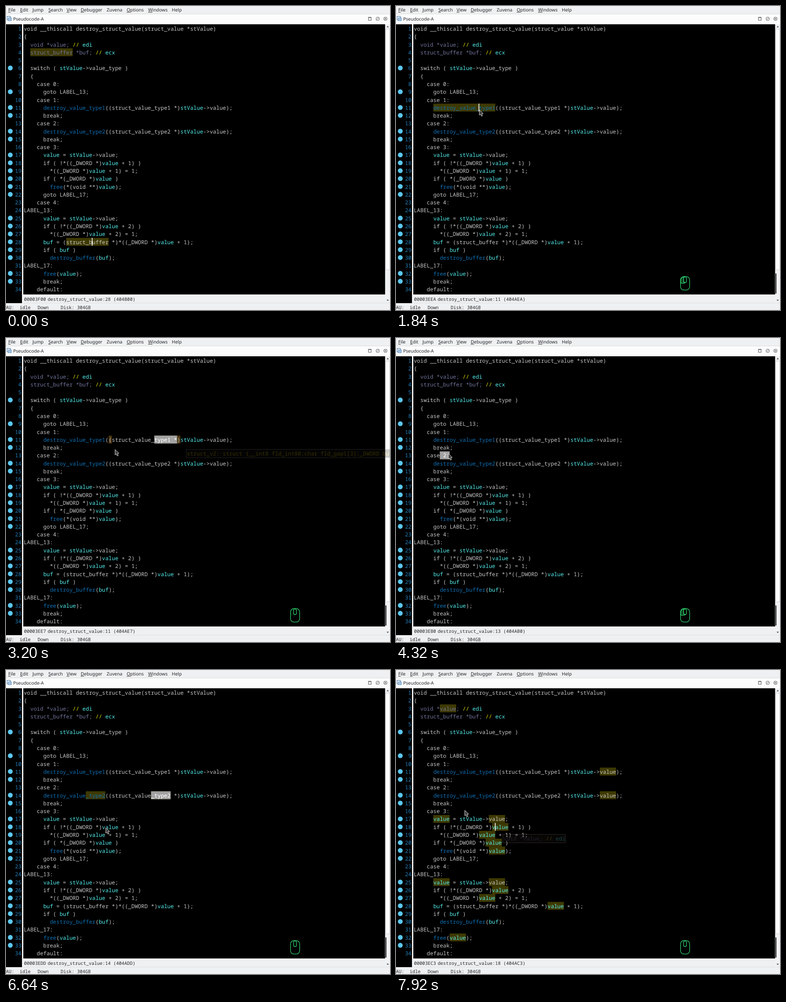
An HTML page that plays this animation: 843x665 px, repeating every 8000 ms.

```html
<!DOCTYPE html>
<html lang="en">
<head>
<meta charset="utf-8">
<title>Pseudocode</title>
<style>
  html, body { margin: 0; width: 100%; height: 100%; overflow: hidden; background: #eff0f1; }
  svg { display: block; width: 100%; height: 100%; }
  text { white-space: pre; text-rendering: geometricPrecision; }
  .code { font: 11.944px "Noto Sans Mono", monospace; fill: #c6c6c6; }
  .ui { font: 10.03px "Noto Sans", sans-serif; fill: #232629; }
  .mono { font: 10.03px "Noto Sans Mono", monospace; fill: #232629; }
  .num { fill: #2380bd; text-anchor: end; }
  .fn { fill: #0f70b4; }
  .var { fill: #55eeee; }
  .decl { fill: #70749c; }
  .note { fill: #e6e600; }
  .key { text-decoration: underline; }
</style>
</head>
<body>
<svg id="stage" viewBox="0 0 843 665" xmlns="http://www.w3.org/2000/svg"></svg>
<script>
const LOOP = 8000, STEP = 80;
const X0 = 38.9, Y0 = 40.7, CW = 7.167, LH = 17.28, BASE = 13.3;

const lines = `void __thiscall destroy_struct_value(struct_value *stValue)
{
  void *value; // edi
  struct_buffer *buf; // ecx

  switch ( stValue->value_type )
  {
    case 0:
      goto LABEL_13;
    case 1:
      destroy_value_type1((struct_value_type1 *)stValue->value);
      break;
    case 2:
      destroy_value_type2((struct_value_type2 *)stValue->value);
      break;
    case 3:
      value = stValue->value;
      if ( !*((_DWORD *)value + 1) )
        *((_DWORD *)value + 1) = 1;
      if ( *(_DWORD *)value )
        free(*(void **)value);
      goto LABEL_17;
    case 4:
LABEL_13:
      value = stValue->value;
      if ( !*((_DWORD *)value + 2) )
        *((_DWORD *)value + 2) = 1;
      buf = (struct_buffer *)*((_DWORD *)value + 1);
      if ( buf )
        destroy_buffer(buf);
LABEL_17:
      free(value);
      break;
    default:`.split("\n");

const breakpoints = [6, 9, 11, 12, 14, 15, 17, 18, 19, 20, 21, 22, 25, 26, 27, 28, 29, 30, 32, 33];

const menu = [["File", 5, 1], ["Edit", 31, 1], ["Jump", 58, 1], ["Search", 93, 1], ["View", 133, 1],
  ["Debugger", 164, 1], ["Zuvena", 221, 0], ["Options", 265, 1], ["Windows", 312, 1], ["Help", 364, 0]];

// Clicks highlight a word; drags select from col to "to" over "dur" ms.
const edits = [
  { at: -1000, line: 28, col: 21, word: "struct_buffer" },
  { at: 1040, line: 10, col: 10 },
  { at: 1840, line: 11, col: 20, word: "destroy_value_type1" },
  { at: 2400, line: 11, col: 40, to: 47, dur: 480 },
  { at: 3920, line: 13, col: 8, to: 11, dur: 400 },
  { at: 4640, line: 14, col: 20, to: 25, dur: 240 },
  { at: 5120, line: 14, col: 39, word: "struct_value_type2" },
  { at: 5520, line: 14, col: 39, to: 45, dur: 320 },
  { at: 7120, line: 18, col: 25, word: "value" }
];

const statuses = [[0, 28, "F00"], [1040, 10, "EB0"], [1840, 11, "EEA"], [2720, 11, "EE7"],
  [4160, 13, "EB0"], [4720, 14, "EE0"], [5120, 14, "EDD"], [7120, 18, "EC3"]];

const pointerPath = [[480, 190, 514], [1040, 112, 206], [1280, 112, 206], [1680, 183, 227], [2080, 183, 227],
  [2400, 327, 226], [2880, 377, 228], [3040, 378, 229], [3200, 239.5, 244], [3840, 143, 258],
  [3920, 99, 257], [4160, 99, 257], [4320, 115, 253], [4640, 183, 278], [4880, 220, 280], [5120, 321, 279],
  [5520, 321, 279], [5840, 363, 281], [5960, 363, 281], [6640, 219, 345], [6960, 218, 344],
  [7600, 218, 344], [7920, 151, 307], [8000, 146, 303]];

const presses = [[1040, 1280], [1840, 2080], [2480, 3040], [4160, 4400], [4640, 4880],
  [5120, 5280], [5520, 6000], [7120, 7360]];

const clamp = v => Math.max(0, Math.min(1, v));
const ramp = (t, a, b) => clamp((t - a) / (b - a));
const colX = c => X0 + c * CW;
const rowY = n => Y0 + (n - 1) * LH;
const esc = s => s.replace(/&/g, "&amp;").replace(/</g, "&lt;").replace(/>/g, "&gt;");
const span = (cls, s) => `<tspan class="${cls}">${esc(s)}</tspan>`;
const box = (x, y, w, h, fill, more = "") =>
  `<rect x="${x}" y="${y}" width="${w}" height="${h}" fill="${fill}" ${more}/>`;
const label = (cls, x, y, body, more = "") => `<text class="${cls}" x="${x}" y="${y}" ${more}>${body}</text>`;
const cells = (n, a, b, fill) => box(colX(a), rowY(n), (b - a) * CW, LH, fill);
const last = (list, test) => list.filter(test).pop();

function paint(s, n) {
  if (n === 1) return esc(s);
  const decl = s.match(/^(.*;)( *\/\/)( \w+)$/);
  if (decl) return span("decl", decl[1]) + span("note", decl[2]) + span("var", decl[3]);
  const token = /(\b(?:destroy_\w+|free)(?=\())|((?<!>)\b(?:value|stValue|buf)\b)/g;
  let out = "", pos = 0;
  for (const m of s.matchAll(token)) {
    out += esc(s.slice(pos, m.index)) + span(m[1] ? "fn" : "var", m[0]);
    pos = m.index + m[0].length;
  }
  return out + esc(s.slice(pos));
}

function chrome() {
  const items = menu.map(([s, x, key]) =>
    label("ui", x, 12.1, key ? span("key", s[0]) + s.slice(1) : s)).join("");
  const button = (x, mark) => `<g transform="translate(${x} 28)" fill="none" stroke="#3a3d40" stroke-width=".9">${mark}</g>`;
  const round = `<rect x="-3.3" y="-3.3" width="6.6" height="6.6" rx="1.8"/>`;
  return box(0, 0, 843, 665, "#eff0f1") + items
    + box(0, 17.5, 843, 22.5, "#fcfcfc") + box(0, 17, 843, .7, "#cfd1d2")
    + box(2.5, 22.5, 7, 8, "#fff", `stroke="#3f6f9f" stroke-width="1"`)
    + box(5, 26, 6.5, 6, "#dceaf7", `stroke="#2f6fae" stroke-width="1"`)
    + box(6.5, 28.5, 3.5, 1, "#2f6fae")
    + label("ui", 15.7, 31.6, "Pseudocode-A")
    + button(798.7, `<rect x="-3" y="-3.2" width="6" height="6.4"/><path d="M-3-2.8H3"/>`)
    + button(816, round + `<path d="M-1.6 1.6L1.6-1.6"/>`)
    + button(833, round + `<path d="M-1.6 1.6L1.6-1.6M-1.6-1.6L1.6 1.6"/>`);
}

function editor() {
  const dots = breakpoints.map(n =>
    `<circle cx="9.4" cy="${rowY(n) + 8.5}" r="5.3" fill="#5cc8ef"/>`).join("");
  const nums = lines.map((s, i) => label("code num", 34, rowY(i + 1) + BASE, i + 1)).join("");
  return box(0, 40, 35.3, 610, "#000") + box(35.3, 40, 2.7, 610, "#f4f4f4")
    + box(38, 40, 794.5, 591, "#000") + dots + nums;
}

function scrollbar() {
  return box(832.5, 40, 10.5, 610, "#f0f1f2")
    + box(833.4, 50.5, 9.2, 526.5, "#fcfcfc", `stroke="#c3c6c8" stroke-width=".8"`)
    + `<path d="M835.5 46.5L838 43.5L840.5 46.5zM835.5 642.5L838 645.5L840.5 642.5z" fill="#4d5052"/>`;
}

function tip(id, x, y, w, body) {
  return `<g id="${id}">` + box(x, y, w, 18.5, "#1c1714", `stroke="#a0968c" stroke-width="1"`)
    + label("code", x + 1.5, y + 13.8, body) + `</g>`;
}

const mouse = `<g id="mouse">` + box(833.2, 585, 1.8, 44, "#000")
  + `<g fill="none" stroke="#2fd06e" stroke-width="1.3">
  <rect x="624.6" y="591.8" width="20" height="29.6" rx="7.5"/>
  <path id="press" d="M633.6 592.2Q626 592.5 625 599.5V606.2Q631 607.3 634.4 605.6Q631.2 604 631.4 600V596Q631.5 593.5 633.6 592.2z" fill="#0c3a1e"/>
  <rect x="631.4" y="592.6" width="6.2" height="12.6" rx="3.1"/></g></g>`;

const stage = document.getElementById("stage");
stage.innerHTML = chrome() + editor() + `<g id="marks"></g>`
  + lines.map((s, i) => label("code", X0, rowY(i + 1) + BASE, paint(s, i + 1))).join("")
  + `<g id="front"></g>` + scrollbar()
  + box(38, 631, 795, 19, "#eff0f1") + box(0, 650, 843, 15, "#eff0f1") + box(38, 649.6, 805, .7, "#d4d6d8")
  + label("mono", 39.6, 644.6, "", `id="offset"`) + label("mono", 91.6, 644.6, "", `id="place"`)
  + [["AU:", 0], ["idle", 30], ["Down", 69.6], ["Disk: 304GB", 120]].map(([s, x]) => label("mono", x, 663.2, s)).join("")
  + tip("typeTip", 395.5, 243.5, 460, `<tspan fill="#f5dc00">struct_v2: struct {__int8 fld_int80;char fld_gap1[3];_DWORD buf;</tspan>`)
  + tip("varTip", 234.5, 359.5, 137.5, span("decl", "void *value;") + span("note", " //") + span("var", " edi"))
  + mouse
  + `<path id="pointer" d="M0 0V11.8L2.6 9.6L4.7 14L7 12.9L5 8.7L8.4 8.2z" fill="#3a3a3a" stroke="#d8d8d8" stroke-width="1" stroke-linejoin="round"/>`;

const el = id => document.getElementById(id);
const fade = (id, v) => el(id).setAttribute("opacity", v.toFixed(3));

function pointerAt(t) {
  const i = Math.max(1, pointerPath.findIndex(p => p[0] >= t));
  const [a, x, y] = pointerPath[i - 1], [b, u, v] = pointerPath[i];
  const k = ramp(t, a, b);
  return [x + (u - x) * k, y + (v - y) * k];
}

function findAll(text, whole) {
  const safe = text.replace(/[.*+?^${}()|[\]\\]/g, "\\$&");
  const re = new RegExp(whole ? `\\b${safe}\\b` : safe, "g");
  return lines.flatMap((s, i) => [...s.matchAll(re)].map(m => [i + 1, m.index]));
}

function openingParen(s, end) {
  let depth = 0;
  for (let i = end; i >= 0; i--) {
    depth += (s[i] === ")") - (s[i] === "(");
    if (!depth) return i;
  }
}

function drawEdit(t) {
  const e = last(edits, d => d.at <= t);
  const s = lines[e.line - 1];
  const end = e.to ? Math.round(e.col + (e.to - e.col) * ramp(t, e.at, e.at + e.dur)) : e.col;
  const picked = s.slice(e.col, end);
  const text = e.word || picked;
  let marks = "", front = "";

  if (text.trim())
    for (const [n, c] of findAll(text, !!e.word)) marks += cells(n, c, c + text.length, "#3e3900");
  if (picked) {
    marks += cells(e.line, e.col, end, "#a2a2a2");
    front += label("code", colX(e.col), rowY(e.line) + BASE, esc(picked), `style="fill:#fff"`);
    if (s[end] === ")")
      for (const c of [openingParen(s, end), end]) marks += cells(e.line, c, c + 1, "#4d3712");
  } else if (t - e.at < 500 || (t + 840) % 1000 >= 500) {
    front += box(colX(end) - 1, rowY(e.line), 1.6, LH, "#fff");
  }
  el("marks").innerHTML = marks;
  el("front").innerHTML = front;
}

function draw(t) {
  drawEdit(t);
  // Addresses follow file offsets: 3Exx maps to 404Axx, 3F00 to 404B00.
  const [, line, addr] = last(statuses, s => s[0] <= t);
  const page = addr[0] === "F" ? "B" : "A";
  el("offset").textContent = "00003" + addr;
  el("place").textContent = `destroy_struct_value:${line} (404${page}${addr.slice(1)})`;

  const [x, y] = pointerAt(t);
  el("pointer").setAttribute("transform", `translate(${x.toFixed(2)} ${y.toFixed(2)})`);
  fade("pointer", t >= 480 ? 1 : 0);

  fade("mouse", ramp(t, 960, 1440));
  fade("press", Math.max(...presses.map(([a, b]) => t < a ? 0 : 1 - ramp(t, b, b + 190))));
  fade("typeTip", ramp(t, 2960, 3080) * (1 - ramp(t, 3080, 3230)));
  fade("varTip", ramp(t, 7440, 7600) * (1 - ramp(t, 7700, 8000)));
}

let shown = -1;
function tick(now) {
  const t = Math.floor((now % LOOP) / STEP) * STEP;
  if (t !== shown) draw(shown = t);
  requestAnimationFrame(tick);
}
draw(0);
requestAnimationFrame(tick);
</script>
</body>
</html>
```
